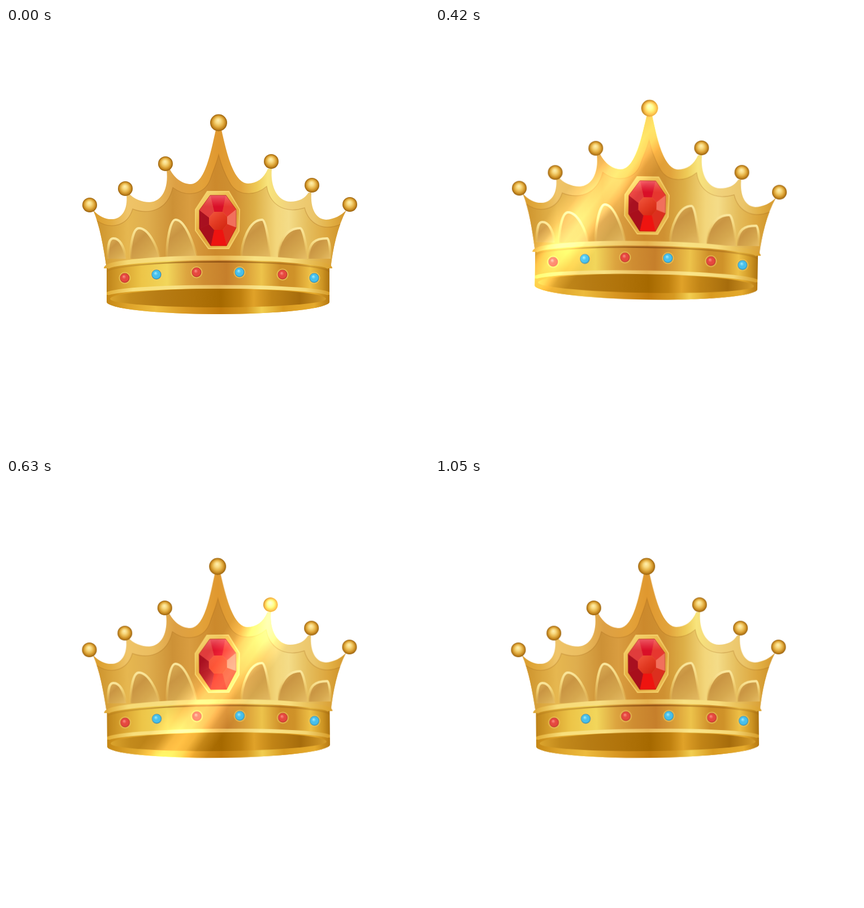
Recreate the animation shown at these times as an HTML page with a canvas. Size 748 by 748 pixels, loop 1.12 s.

```html
<!DOCTYPE html>
<html lang="en">
<head>
<meta charset="utf-8">
<title>Crown</title>
<style>
html, body { margin: 0; width: 100%; height: 100%; overflow: hidden; background: #fff; }
canvas { display: block; }
</style>
</head>
<body>
<canvas id="stage" width="748" height="748"></canvas>
<script>
const SIZE = 748, STEP = 70, STEPS = 16;
const stage = document.getElementById('stage').getContext('2d');
const art = document.createElement('canvas');
art.width = art.height = SIZE;
const g = art.getContext('2d');

function linear(ctx, x0, y0, x1, y1, stops) {
  const grad = ctx.createLinearGradient(x0, y0, x1, y1);
  stops.forEach(([at, color]) => grad.addColorStop(at, color));
  return grad;
}

function radial(x, y, r, stops, dx = 0, dy = 0) {
  const grad = g.createRadialGradient(x + dx, y + dy, 0, x, y, r);
  stops.forEach(([at, color]) => grad.addColorStop(at, color));
  return grad;
}

// Horizontal gradient with stops given as x positions
function across(stops, x0 = 150, x1 = 605) {
  return linear(g, x0, 0, x1, 0, stops.map(([x, c]) => [(x - x0) / (x1 - x0), c]));
}

function fill(path, paint) {
  g.fillStyle = paint;
  g.fill(path);
}

function stroke(path, paint, width) {
  g.strokeStyle = paint;
  g.lineWidth = width;
  g.stroke(path);
}

function disc(x, y, r, paint) {
  g.fillStyle = paint;
  g.beginPath();
  g.arc(x, y, r, 0, Math.PI * 2);
  g.fill();
}

function polygon(points) {
  return new Path2D('M' + points.map(p => p.join(' ')).join('L') + 'Z');
}

function ball(x, y, r) {
  disc(x, y, r, radial(x, y, r, [
    [0, '#fff0b0'], [.3, '#f8da82'], [.6, '#e4b044'], [.82, '#c5871f'], [1, '#965f0c']
  ], -1, -r * .3));
}

function drawBody() {
  const body = new Path2D('M154 322C165 334 178 339 189 338C204 337 216 322 213 294L217 292' +
    'C225 302 240 308 254 308C275 307 288 285 284 251L290 250C298 266 312 276 327 276' +
    'C352 275 362 220 371 180L381 180C390 220 402 274 428 275C443 275 456 266 463 249L470 249' +
    'C467 280 480 307 503 307C517 307 528 302 535 291L540 291C538 320 548 338 566 339' +
    'C580 338 592 332 602 322C586 352 578 390 574 425L178 425C172 385 166 350 154 322Z');
  const face = new Path2D('M160 340C185 358 215 350 224 320C250 330 285 325 295 282' +
    'C318 300 350 296 361 268C367 250 373 238 376 224C380 240 388 260 395 272' +
    'C408 298 440 298 461 280C466 310 490 330 528 318C535 345 560 362 594 346L574 425L178 425Z');

  fill(body, across([
    [150, '#d99a2a'], [185, '#e3ac40'], [215, '#efc468'], [260, '#ebbd5f'], [300, '#dda044'],
    [345, '#e3a23a'], [376, '#e0982f'], [415, '#e2a43c'], [445, '#efcc58'], [463, '#f8e47c'],
    [500, '#f1d27c'], [545, '#ebc569'], [575, '#e2af43'], [605, '#d2932a']
  ]));

  g.save();
  g.clip(body);
  fill(face, across([
    [150, '#c98d26'], [180, '#d6a039'], [215, '#e6b750'], [250, '#dfae4e'], [295, '#cd9136'],
    [325, '#d99d40'], [370, '#cc892c'], [405, '#cf9132'], [440, '#ddaf47'], [478, '#f3d67b'],
    [500, '#f4dc88'], [535, '#e5bd5c'], [570, '#dca53c'], [605, '#c88c22']
  ]));
  stroke(face, 'rgba(160,100,25,.3)', 1.4);
  drawArches();
  g.restore();
}

function drawArches() {
  const arches = [
    [180, 190, 212, 372], [220, 235, 272, 354], [284, 300, 338, 339],
    [416, 453, 468, 339], [481, 520, 533, 354], [535, 568, 574, 372]
  ];
  for (const [left, peak, right, top] of arches) {
    const a = (peak - left) * .62, b = (right - peak) * .45;
    const arch = new Path2D(`M${left} 408C${left} 378 ${peak - a} ${top} ${peak} ${top}` +
      `C${peak + b} ${top} ${right - (right - peak) * .15} 384 ${right} 408`);
    fill(arch, linear(g, left, top, right, 408, [
      [0, '#dfb359'], [.35, '#c99543'], [.7, '#d6a84f'], [1, '#e6bd65']
    ]));
    stroke(arch, linear(g, 0, top - 2, 0, 404, [
      [0, '#fbe9a2'], [.35, '#f4d77f'], [1, 'rgba(235,195,95,.2)']
    ]), 4.2);
  }
}

function drawBand() {
  const band = new Path2D('M178 424A197 19 0 0 1 572 424V484A197 22 0 0 1 178 484Z');
  const topEdge = new Path2D('M177 425A198 18.5 0 0 1 573 425');
  const shade = new Path2D('M178 432A197 18.5 0 0 1 572 432');
  const lowEdge = new Path2D('M178 472A197 14 0 0 1 572 472');
  const inside = new Path2D('M178 475A197 14 0 0 1 572 475V520H178Z');
  const hole = new Path2D('M184 479A191 18 0 0 1 566 479A191 15 0 0 1 184 479Z');

  fill(band, across([
    [178, '#be8319'], [205, '#d8a22f'], [240, '#edc548'], [285, '#f2d65b'], [320, '#dca43f'],
    [350, '#cf8d32'], [390, '#c67f2b'], [425, '#dba139'], [452, '#edc34b'], [485, '#ce8f29'],
    [510, '#cf9229'], [538, '#eec046'], [560, '#cc9322'], [572, '#ad7310']
  ], 178, 572));

  g.save();
  g.clip(band);
  stroke(shade, across([
    [178, 'rgba(145,85,15,.1)'], [290, 'rgba(145,85,15,.55)'], [376, 'rgba(130,70,15,.8)'],
    [460, 'rgba(145,85,15,.5)'], [572, 'rgba(145,85,15,.2)']
  ], 178, 572), 2.6);
  stroke(lowEdge, across([
    [178, '#e2ac34'], [225, '#f8df7c'], [300, '#f9e284'], [376, '#e9b85a'],
    [450, '#fae68b'], [530, '#f4d673'], [572, '#d79c28']
  ], 178, 572), 7);
  fill(inside, across([
    [178, '#c58715'], [215, '#dda229'], [265, '#edbb3c'], [320, '#d99722'], [380, '#c27b0c'],
    [425, '#d79a22'], [452, '#f2ce50'], [490, '#d99a20'], [545, '#e5aa2c'], [572, '#b77912']
  ], 178, 572));
  fill(hole, across([
    [184, '#dba42d'], [220, '#c38a1c'], [270, '#b77c14'], [330, '#b0730a'], [380, '#a66900'],
    [415, '#bf800f'], [438, '#e0a229'], [470, '#c18416'], [520, '#a66c0c'], [566, '#d59b2a']
  ], 184, 566));
  g.restore();

  stroke(topEdge, across([
    [176, '#dfa838'], [215, '#f6da75'], [290, '#f8df83'], [376, '#e7b451'],
    [440, '#f8e283'], [500, '#f8dd7d'], [574, '#dba231']
  ], 176, 574), 8);
}

function drawStuds() {
  const red = ['#ff948a', '#e5483f', '#b92c2b'];
  const blue = ['#a5efff', '#48bfeb', '#2389b8'];
  const studs = [[210, 442], [266, 436], [337, 432], [413, 432], [489, 436], [545, 442]];
  studs.forEach(([x, y], i) => {
    const [light, mid, dark] = i % 2 ? blue : red;
    disc(x, y, 11, radial(x, y, 11, [
      [0, '#d49a35'], [.75, '#dca63e'], [.86, 'rgba(240,205,100,.7)'], [1, 'rgba(247,217,112,0)']
    ]));
    disc(x, y, 8.4, radial(x, y, 8.4, [[0, light], [.45, mid], [.8, mid], [1, dark]], -2, -3));
  });
}

function drawGem() {
  const frame = polygon([[356, 289], [394, 289], [413, 321], [412, 359],
    [394, 390], [358, 390], [335, 358], [335, 321]]);
  fill(frame, linear(g, 335, 289, 413, 390, [
    [0, '#f7dc7a'], [.35, '#ecb94c'], [.6, '#e0a23a'], [1, '#f2cc62']
  ]));
  stroke(frame, 'rgba(248,216,112,.8)', 2);

  const outer = [[361, 296], [389, 296], [407, 321], [407, 353],
    [390, 385], [362, 385], [342, 355], [342, 322]];
  const inner = [[368, 325], [383, 325], [391, 334], [391, 347],
    [383, 357], [368, 357], [359, 347], [359, 335]];
  const tones = ['#d90f28', '#e6372f', '#f1705c', '#dc2f1e',
    '#ee1410', '#a80f1c', '#a81020', '#e03c3c'];
  tones.forEach((tone, i) => {
    const j = (i + 1) % 8;
    const facet = polygon([outer[i], outer[j], inner[j], inner[i]]);
    fill(facet, tone);
    stroke(facet, tone, .6);
  });
  const gem = polygon(outer);
  fill(gem, linear(g, 0, 296, 0, 316, [
    [0, 'rgba(255,150,150,.55)'], [1, 'rgba(255,120,120,0)']
  ]));
  stroke(gem, 'rgba(150,30,15,.45)', 1);
  fill(polygon(inner), linear(g, 362, 325, 388, 357, [
    [0, '#f0553c'], [.5, '#e23a22'], [1, '#d2240f']
  ]));
}

function drawCrown() {
  drawBody();
  drawBand();
  drawStuds();
  drawGem();
  [[148, 313], [211, 284], [282, 240], [469, 236], [541, 278], [608, 312]]
    .forEach(([x, y]) => ball(x, y, 13));
  ball(376, 167.5, 15);
}

// Diagonal glint; on white the additive light leaves the backdrop unchanged
function drawGlint(k) {
  const power = Math.min(1, Math.max(0, (15 - k) / 2));
  if (!power) return;
  const slope = .738, half = 66;
  const center = 617 + 43.5 * (k - 8);
  const n = 1 + slope * slope;
  const at = c => [c / n, c * slope / n];
  const tint = a => `rgba(80,76,56,${a * power})`;
  stage.globalCompositeOperation = 'lighter';
  stage.fillStyle = linear(stage, ...at(center - half), ...at(center + half), [
    [0, tint(0)], [.2, tint(.3)], [.36, tint(.85)], [.5, tint(1)],
    [.64, tint(.85)], [.8, tint(.3)], [1, tint(0)]
  ]);
  stage.fillRect(100, 130, 550, 400);
  stage.globalCompositeOperation = 'source-over';
}

function render(now) {
  const k = Math.floor(now / STEP) % STEPS;
  const phase = k % 8;
  const lift = (4 - Math.abs(phase - 4)) / 4;
  const tilt = (k < 8 ? 2 : -2) * lift * Math.PI / 180;
  stage.setTransform(1, 0, 0, 1, 0, 0);
  stage.fillStyle = '#fff';
  stage.fillRect(0, 0, SIZE, SIZE);
  stage.translate(374, 374 - 51.4 * lift);
  stage.rotate(tilt);
  stage.translate(-374, -374);
  stage.drawImage(art, 0, 0);
  drawGlint(k);
}

drawCrown();
const start = performance.now();
function tick() {
  render(performance.now() - start);
  requestAnimationFrame(tick);
}
tick();
</script>
</body>
</html>
```
